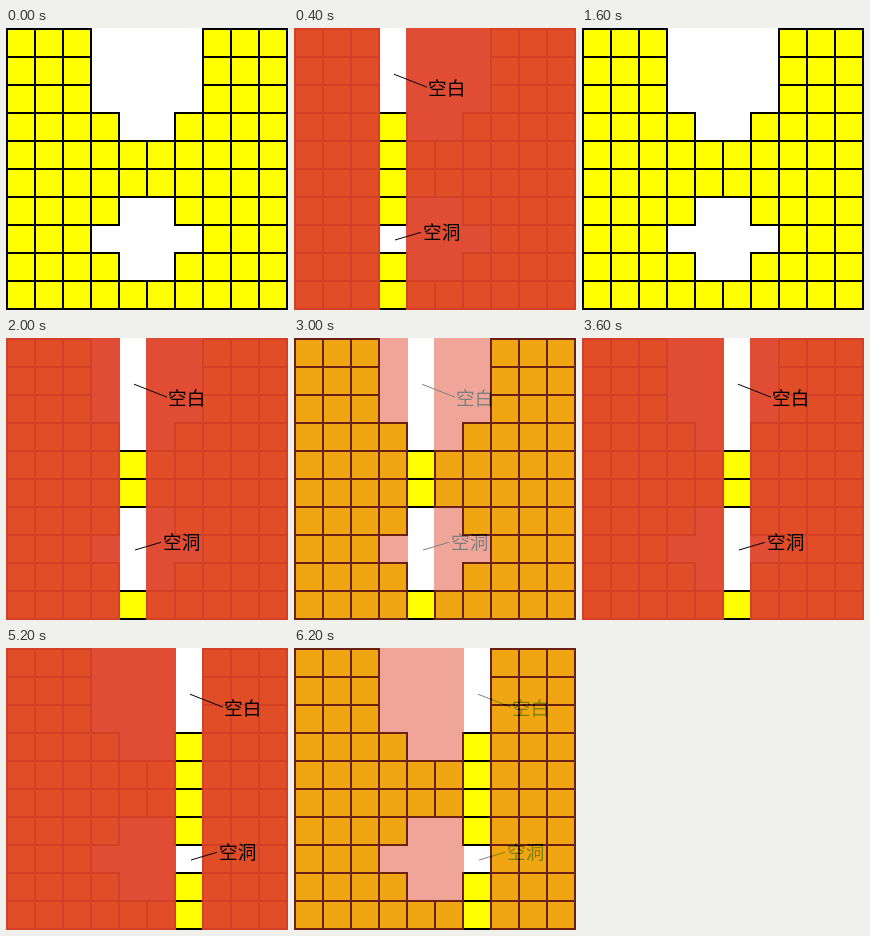
An HTML page that plays this animation: 282x282 px, repeating every 6.4 s.

```html
<!DOCTYPE html>
<html lang="zh-CN">
<head>
<meta charset="utf-8">
<title>空白与空洞</title>
<style>
  html, body { margin: 0; width: 100%; height: 100%; overflow: hidden; background: #fff; }
  svg { display: block; }
  text { font: 18.67px "Noto Sans CJK SC", "Noto Sans CJK", sans-serif; }
</style>
</head>
<body>
<svg width="282" height="282" viewBox="0 0 282 282">
  <g id="grid" fill="#ff0" stroke="#000" stroke-width="2"></g>
  <g id="focus" opacity="0">
    <path d="M-300 0H2V282H-300ZM28 0H300V282H28Z" fill="#e0442a" fill-opacity=".95"/>
    <path d="M16 46.2L49 59.2M17 212L43 204.3" stroke="#000"/>
    <text x="50" y="67">空白</text>
    <text x="45" y="211">空洞</text>
  </g>
</svg>
<script>
const CELL = 28, STEP = 1600, COLUMNS = 4, FIRST = 3;
const grid = document.getElementById('grid');
const focus = document.getElementById('focus');

// Empty cells per row, counted outward from the middle
const gaps = [2, 2, 2, 1, 0, 0, 1, 2, 1, 0];

gaps.forEach((gap, row) => {
  for (let col = 0; col < 10; col++) {
    if (Math.abs(col - 4.5) < gap) continue;
    const cell = document.createElementNS('http://www.w3.org/2000/svg', 'rect');
    const box = { x: col * CELL + 1, y: row * CELL + 1, width: CELL, height: CELL };
    for (const key in box) cell.setAttribute(key, box[key]);
    grid.append(cell);
  }
});

function opacityAt(t) {
  if (t < 200) return 0;
  return t < 400 || t >= 1400 ? 0.5 : 1;
}

function draw(now) {
  const t = now % (STEP * COLUMNS);
  const col = FIRST + Math.floor(t / STEP);
  focus.setAttribute('transform', `translate(${col * CELL})`);
  focus.setAttribute('opacity', opacityAt(t % STEP));
  requestAnimationFrame(draw);
}
draw(performance.now());
</script>
</body>
</html>
```
